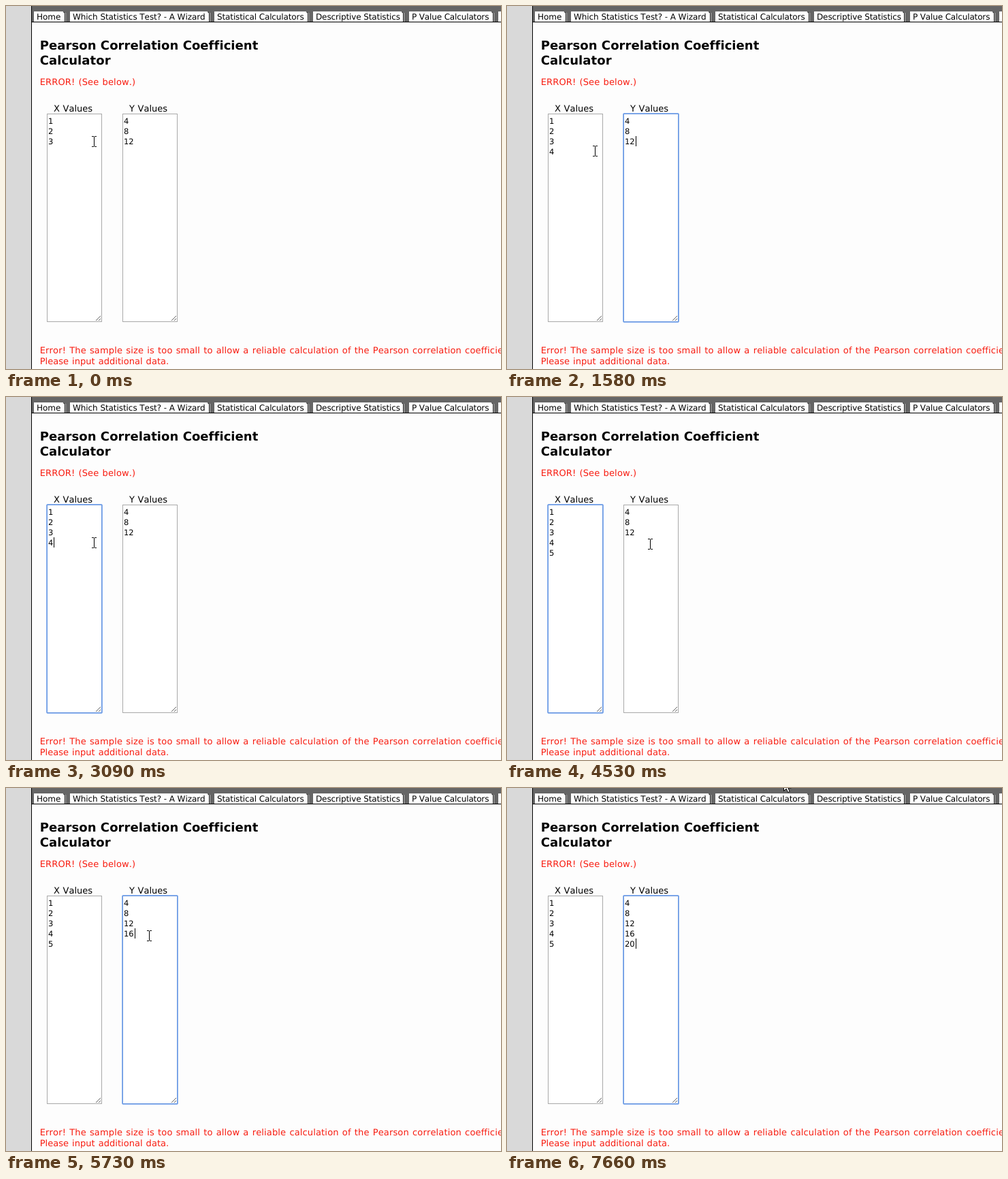
Write an HTML page that moves like this. It is 727 px wide and 533 px high and loops after 8 s.

```html
<!DOCTYPE html>
<html lang="en">
<head>
<meta charset="utf-8">
<title>Correlation calculator</title>
<style>
html, body { margin: 0; width: 100%; height: 100%; overflow: hidden; background: #fdfdfd }
svg { display: block; font: 13px "DejaVu Sans", sans-serif; font-kerning: none; text-rendering: geometricPrecision }
.tabs { font-size: 12px }
.error { fill: #f81c10 }
.values { font-size: 11.5px }
.title { font-size: 18px; font-weight: bold; letter-spacing: .06px }
</style>
</head>
<body>
<svg width="727" height="533" viewBox="0 0 727 533">
  <rect width="727" height="533" fill="#fdfdfd"/>
  <rect width="38" height="533" fill="#d9d9d9"/>
  <rect x="38" width="689" height="23" fill="#666"/>
  <path d="M37.5 0V533M38 23.5H727" stroke="#000"/>
  <g class="tabs" id="tabs"></g>
  <g class="title">
    <text x="49.8" y="64">Pearson Correlation Coefficient</text>
    <text x="49.8" y="86">Calculator</text>
  </g>
  <g class="error" word-spacing=".87">
    <text x="49.7" y="116" letter-spacing=".15">ERROR! (See below.)</text>
    <text x="49.7" y="510" letter-spacing=".15">Error! The sample size is too small to allow a reliable calculation of the Pearson correlation coefficient.</text>
    <text x="49.7" y="526" letter-spacing=".03">Please input additional data.</text>
  </g>
  <g word-spacing=".5">
    <text x="70" y="155">X Values</text>
    <text x="181" y="155">Y Values</text>
  </g>
  <g id="boxes"></g>
  <rect id="caret" width="1" height="15"/>
  <path id="beam" d="M0 .5H3M4 .5H7M3.5 1V15M0 15.5H3M4 15.5H7" stroke="#000" fill="none"/>
  <path id="arrow" d="M.5 .5V16.5L4.2 13L6.7 18.5L9.2 17.5L6.9 12H11.5Z" fill="#fff" stroke="#000"/>
</svg>
<script>
const $ = id => document.getElementById(id);

// left, right, letter spacing, label
const tabs = [
  [41, 87, 0, "Home"],
  [94, 299, -.07, "Which Statistics Test? - A Wizard"],
  [306, 444, -.12, "Statistical Calculators"],
  [451, 584, -.12, "Descriptive Statistics"],
  [592, 716, -.14, "P Value Calculators"],
  [723, 860, 0, ""]
];
$("tabs").innerHTML = tabs.map(([l, r, gap, label]) => `
  <path d="M${l} 23V8H${r - 3}L${r - 1} 10V23Z" fill="#fff"/>
  <path d="M${r - 3} 8.5L${r - .5} 10.5V23" fill="none" stroke="#111"/>
  <path d="M${r + .5} 10V23" stroke="#bbb"/>
  <text x="${l + 4}" y="20" letter-spacing="${gap}">${label}</text>`).join("");

const lefts = [60, 171];
$("boxes").innerHTML = lefts.map((x, i) => `
  <rect x="${x + .5}" y="158.5" width="80" height="305" fill="#fff" stroke="#a9a9a9"/>
  <path d="M${x + 72} 462L${x + 79} 455M${x + 76} 462L${x + 79} 459" stroke="#666"/>
  <g id="ring${i}" fill="none">
    <rect x="${x - .5}" y="157.5" width="82" height="307" rx="1.5" stroke="#8cb2f0"/>
    <rect x="${x + .5}" y="158.5" width="80" height="305" stroke="#6a98e0"/>
  </g>
  <text id="values${i}" class="values"></text>`).join("");

// time, X values, Y values, focused box (-1 for none), caret shown
const edits = [
  [0, "1 2 3", "4 8 12", -1, 0],
  [400, "1 2 3", "4 8 12", 0, 1],
  [870, "1 2 3 ", "4 8 12", 0, 1],
  [1300, "1 2 3 4", "4 8 12", 0, 1],
  [1580, "1 2 3 4", "4 8 12", 1, 1],
  [2010, "1 2 3 4", "4 8 12", -1, 0],
  [3090, "1 2 3 4", "4 8 12", 0, 1],
  [3520, "1 2 3 4", "4 8 12", 0, 0],
  [3670, "1 2 3 4 ", "4 8 12", 0, 1],
  [3820, "1 2 3 4 5", "4 8 12", 0, 1],
  [4410, "1 2 3 4 5", "4 8 12", 0, 0],
  [4680, "1 2 3 4 5", "4 8 12", 1, 1],
  [5140, "1 2 3 4 5", "4 8 12", 1, 0],
  [5290, "1 2 3 4 5", "4 8 12 ", 1, 1],
  [5570, "1 2 3 4 5", "4 8 12 1", 1, 1],
  [5730, "1 2 3 4 5", "4 8 12 16", 1, 1],
  [6160, "1 2 3 4 5", "4 8 12 16 ", 1, 1],
  [6440, "1 2 3 4 5", "4 8 12 16 2", 1, 1],
  [6590, "1 2 3 4 5", "4 8 12 16 20", 1, 1],
  [7140, "1 2 3 4 5", "4 8 12 16 20", 1, 0],
  [7660, "1 2 3 4 5", "4 8 12 16 20", 1, 1]
];

// time, left, top, pointer shape
const moves = [
  [0, 126, 191, "beam"], [560, 126, 205, "beam"], [2840, 126, 206, "beam"],
  [4410, 180, 207, "beam"], [4530, 207, 208, "beam"], [4840, 207, 209, "beam"],
  [7140, 474, 470, "arrow"], [7265, 440, 340, "arrow"], [7390, 405, 216, "arrow"],
  [7660, 406, -12, "arrow"]
];

const at = (list, t) => list.findLast(step => step[0] <= t);
const show = (el, on) => el.setAttribute("visibility", on ? "visible" : "hidden");
const place = (el, x, y) => el.setAttribute("transform", `translate(${x} ${y})`);

function draw(now) {
  const t = now % 8000;
  const [, xs, ys, focus, caretOn] = at(edits, t);
  [xs, ys].forEach((text, i) => {
    const lines = text.split(" ");
    $("values" + i).innerHTML = lines.map((line, row) =>
      `<tspan x="${lefts[i] + 2}" y="${173 + 15 * row}">${line}</tspan>`).join("");
    show($("ring" + i), focus === i);
    if (focus === i) {
      const row = lines.length - 1;
      place($("caret"), Math.round(lefts[i] + 3 + 7.4 * lines[row].length), 161 + 15 * row);
    }
  });
  show($("caret"), caretOn);

  const [, x, y, shape] = at(moves, t);
  for (const id of ["beam", "arrow"]) show($(id), id === shape);
  place($(shape), x, y);
  requestAnimationFrame(draw);
}
draw(performance.now());
</script>
</body>
</html>
```
